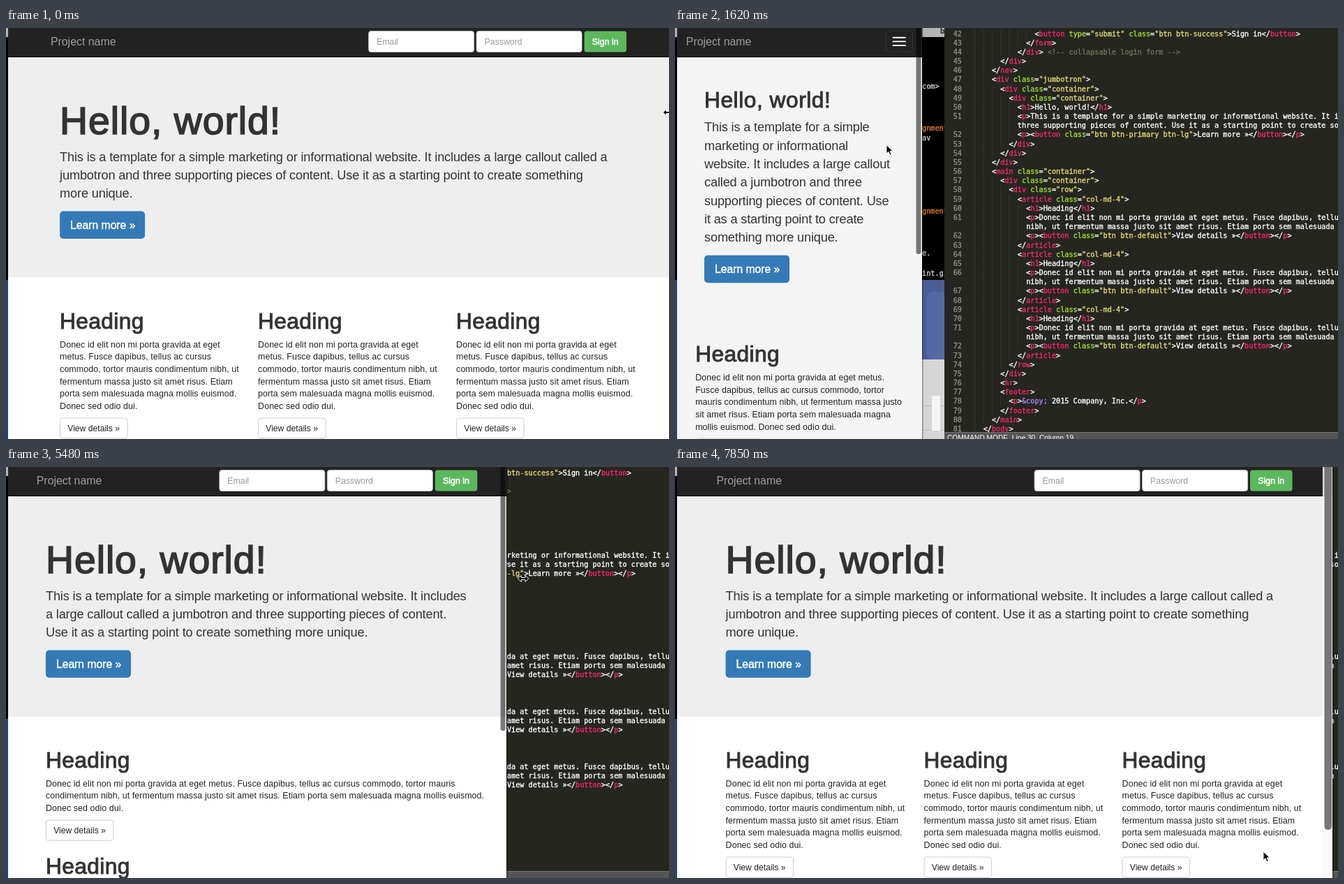
Animation, 950 px wide and 589 px high, one loop 8000 ms. Source, as an HTML page:

```html
<!DOCTYPE html>
<html lang="en">
<head>
<meta charset="utf-8">
<title>Responsive template</title>
<style>
  html, body { margin: 0; width: 100%; height: 100%; overflow: hidden; background: #000; }
  svg { display: block; font-family: "Liberation Sans", Arial, sans-serif; }
  text { white-space: pre; }
  .code { font: 10.2px "DejaVu Sans Mono", Menlo, monospace; color: #fff; }
  .code, .code tspan { fill: currentColor; stroke: currentColor; stroke-width: .35px; }
  .comment { color: #75715e; } .tag { color: #f92672; } .attr { color: #a6e22e; }
  .string { color: #e6db74; } .entity { color: #ae81ff; } .number { color: #8f908a; }
</style>
</head>
<body>
<svg id="stage" width="950" height="589" viewBox="0 0 950 589">
  <g id="desktop"></g>
  <g id="browser"></g>
</svg>
<script>
const LOOP = 8000, LEFT = 3, ZOOM = 0.88;
const LEAD = 'This is a template for a simple marketing or informational website. It includes a large callout called a jumbotron and three supporting pieces of content. Use it as a starting point to create something more unique.';
const BODY = 'Donec id elit non mi porta gravida at eget metus. Fusce dapibus, tellus ac cursus commodo, tortor mauris condimentum nibh, ut fermentum massa justo sit amet risus. Etiam porta sem malesuada magna mollis euismod. Donec sed odio dui.';

// ---------- helpers ----------
const $ = id => document.getElementById(id);
const escapeText = s => s.replace(/&/g, '&amp;').replace(/</g, '&lt;').replace(/>/g, '&gt;');
const rect = (x, y, w, h, fill, extra = '') =>
  `<rect x="${x}" y="${y}" width="${w}" height="${h}" fill="${fill}" ${extra}/>`;
const text = (x, y, size, fill, str, extra = '') =>
  `<text x="${x}" y="${y}" font-size="${size}" fill="${fill}" ${extra}>${escapeText(str)}</text>`;
const medium = (x, y, size, fill, str, weight = 0.025, spacing = 0) =>
  text(x, y, size, fill, str, `stroke="${fill}" stroke-width="${size * weight}" letter-spacing="${size * spacing}"`);

function track(keys, t) {
  const i = keys.findIndex(k => k[0] > t);
  if (i < 0) return keys[keys.length - 1].slice(1);
  if (i === 0) return keys[0].slice(1);
  const a = keys[i - 1], b = keys[i], u = (t - a[0]) / (b[0] - a[0]);
  return a.slice(1).map((v, n) => v + (b[n + 1] - v) * u);
}

const pen = document.createElement('canvas').getContext('2d');
const wrapCache = {};
function wrap(str, size, spacing, width) {
  const key = [str.length, size, width];
  if (wrapCache[key]) return wrapCache[key];
  pen.font = `${size}px "Liberation Sans", Arial, sans-serif`;
  const lines = [];
  let line = '';
  for (const word of str.split(' ')) {
    const next = line ? line + ' ' + word : word;
    if (line && pen.measureText(next).width + next.length * spacing > width) {
      lines.push(line);
      line = word;
    } else line = next;
  }
  return wrapCache[key] = [...lines, line];
}

// ---------- editor and desktop behind the browser ----------
const article = [
  [4, '<article class="col-md-4">'],
  [5, '<h1>Heading</h1>'],
  [5, '<p>Donec id elit non mi porta gravida at eget metus. Fusce dapibus, tellus ac cursus'],
  [5, 'nibh, ut fermentum massa justo sit amet risus. Etiam porta sem malesuada magna', 1],
  [5, '<p><button class="btn btn-default">View details »</button></p>'],
  [4, '</article>']
];
const source = [
  [6, '<button type="submit" class="btn btn-success">Sign in</button>'],
  [5, '</form>'],
  [4, '</div> <!-- collapsable login form -->'],
  [2, '</div>'],
  [1, '</nav>'],
  [1, '<div class="jumbotron">'],
  [2, '<div class="container">'],
  [3, '<div class="container">'],
  [4, '<h1>Hello, world!</h1>'],
  [4, '<p>This is a template for a simple marketing or informational website. It includes'],
  [4, 'three supporting pieces of content. Use it as a starting point to create something', 1],
  [4, '<p><button class="btn btn-primary btn-lg">Learn more »</button></p>'],
  [3, '</div>'],
  [2, '</div>'],
  [1, '</div>'],
  [1, '<main class="container">'],
  [2, '<div class="container">'],
  [3, '<div class="row">'],
  ...article, ...article, ...article,
  [3, '</row>'],
  [2, '</div>'],
  [2, '<hr>'],
  [2, '<footer>'],
  [3, '<p>&copy; 2015 Company, Inc.</p>'],
  [2, '</footer>'],
  [1, '</main>'],
  [0, '</body>']
];

function highlight(line) {
  const span = (cls, s) => `<tspan class="${cls}">${escapeText(s)}</tspan>`;
  const token = /(<!--.*-->)|(<\/?)(\w+)|(\w+)(?==")|("[^"]*")|(&\w+;)/g;
  let out = '', last = 0;
  for (const m of line.matchAll(token)) {
    out += escapeText(line.slice(last, m.index));
    if (m[1]) out += span('comment', m[1]);
    else if (m[2]) out += escapeText(m[2]) + span('tag', m[3]);
    else if (m[4]) out += span('attr', m[4]);
    else if (m[5]) out += span('string', m[5]);
    else out += span('entity', m[6]);
    last = m.index + m[0].length;
  }
  return out + escapeText(line.slice(last));
}

function editor() {
  const indentWidth = 12.29, rowHeight = 13.17;
  let number = 42;
  let out = rect(386, 0, 564, 589, '#252620');
  source.forEach(([indent, line, continued], i) => {
    const y = 11.6 + i * rowHeight;
    for (let j = -1; j < indent; j++)
      out += rect(441.5 + j * indentWidth, y - 10, 1, rowHeight, '#3b3c35', 'opacity=".7"');
    if (!continued) out += `<text class="code number" x="411" y="${y}" text-anchor="end">${number++}</text>`;
    out += `<text class="code" x="${441.7 + indent * indentWidth}" y="${y}">${highlight(line)}</text>`;
  });
  return out + rect(386, 579, 564, 10, '#555') + rect(386, 579, 564, 1, '#777') +
    text(390, 591, 10.2, '#fff', 'COMMAND MODE, Line 30, Column 19');
}

function desktop() {
  const shell = (y, str, color = '#d0d0d0') => `<text class="code" x="354" y="${y}" style="color:${color}">${str}</text>`;
  return rect(0, 0, 390, 361, '#000') + rect(0, 0, 390, 13, '#b4b4b4') +
    text(380, 8, 10.5, '#222', 'b', 'font-weight="bold"') +
    shell(87, 'com&gt;') + shell(147, 'gnment', '#e07a1f') + shell(161, 'av') +
    shell(266, 'gnment', '#e07a1f') + shell(326, 'e.') + shell(355, 'int.gi') +
    rect(0, 361, 3, 228, '#2b427f') + rect(3, 361, 383, 114, '#4a5d94') +
    rect(361, 378, 40, 97, '#566aa2', 'rx="8"') +
    rect(3, 475, 383, 114, '#d6d6d6') + rect(354, 541, 32, 1, '#bbb') +
    rect(354, 576, 32, 1, '#bbb') + rect(368, 527, 12, 50, '#f4f4f4');
}

// ---------- web page ----------
const input = (x, y, w, label) =>
  rect(x, y, w, 30, '#fff', 'rx="3.5" stroke="#ccc" stroke-width=".8"') + text(x + 11.5, y + 19.3, 12.3, '#999', label);
const signIn = (x, y) =>
  rect(x, y, 60.5, 30, '#5cb85c', 'rx="3.5"') + medium(x + 11.2, y + 19.3, 12.4, '#fff', 'Sign in', 0.04);

function section(x, baseline, width) {
  const lines = wrap(BODY, 12.45, 0.07, width);
  const top = baseline + 23 + (lines.length - 1) * 17.6 + 17.5;
  const out = medium(x, baseline, 31.7, '#333', 'Heading', 0.03, 0.012) +
    lines.map((s, i) => text(x, baseline + 27.3 + i * 17.6, 12.45, '#222', s, 'letter-spacing=".07"')).join('') +
    rect(x + 0.5, top, 96.5, 29, '#fff', 'rx="3.5" stroke="#ccc"') +
    text(x + 11.2, top + 19, 12.15, '#222', 'View details »');
  return { out, bottom: top + 29.5 };
}

function menu(right, height) {
  if (height < 1) return '';
  const w = right - LEFT;
  return `<svg x="${LEFT}" y="41" width="${w}" height="${height + 1}">` +
    rect(0, 0, w, 140, '#222') + rect(0, 0, w, 1, '#101010') + rect(0, 7, w, 1, '#101010') +
    input(13, 17, w - 26, 'Email') + input(13, 51, w - 26, 'Password') + signIn(13, 86) +
    rect(0, 125, w, 1, '#101010') + '</svg>' + rect(LEFT, 41 + height, w, 1, '#080808');
}

function navbar(left, right, edge, phone, t) {
  let out = rect(LEFT, 0, right - LEFT, 42, '#222') + rect(LEFT, 41, right - LEFT, 1, '#080808') +
    text(left, 24.6, 15.9, '#9d9d9d', 'Project name');
  if (phone) {
    const focused = t >= 2650 && t < 4880;
    out += rect(right - 51.5, 4.5, 38, 29.5, focused ? '#333' : 'none', 'rx="3.5" stroke="#333"');
    for (const y of [12.8, 18.4, 24]) out += rect(right - 42.5, y, 19.5, 1.9, '#fff', 'rx=".9"');
    return out;
  }
  const end = edge - 15.2;
  return out + input(end - 369.5, 4.4, 151, 'Email') + input(end - 215, 4.4, 151, 'Password') + signIn(end - 60.5, 4.4);
}

function page(right, t) {
  const phone = right < 679, wide = right >= 876;
  const container = (wide ? 970 : 750) * ZOOM;
  const start = phone ? LEFT : (right + 4) / 2 - container / 2;
  const brand = start + 13.2;
  const leadX = phone ? 42 : brand + 13.2;
  const mainX = phone ? 29.2 : leadX;
  const leadWidth = phone ? right - 82 : wide ? 795 : 610;
  const lines = wrap(LEAD, 18.2, -0.165, leadWidth);
  const leadY = phone ? 148.3 : 190.5;
  const buttonY = leadY + (lines.length - 1) * 26.35 + 19.3;
  const bottom = buttonY + 95;

  const settling = t > 1000 && t < 2750;
  const narrowed = t > 2750 && t < 4880;
  const below = settling ? '#f4f4f4' : narrowed ? '#f3f3f3' : '#fff';
  const jumboEnd = settling ? 0 : narrowed ? 325 : bottom;

  let out = rect(0, 0, right, 589, below) + rect(0, 0, right, jumboEnd, '#eee');
  out += medium(leadX, phone ? 114.3 : 152, phone ? 31.7 : 55.4, '#333', 'Hello, world!', 0.03, 0.017);
  lines.forEach((s, i) => out += text(leadX, leadY + i * 26.35, 18.2, '#333', s, 'letter-spacing="-.165"'));
  out += rect(leadX, buttonY, 122, 39.5, '#337ab7', 'rx="5"') +
    medium(leadX + 15, buttonY + 25.6, 15.7, '#fff', 'Learn more »', 0.03);

  let baseline = buttonY + (phone ? 152.2 : 168);
  if (wide) {
    for (let i = 0; i < 3; i++) out += section(mainX + i * 284, baseline, 262).out;
  } else {
    for (let i = 0; i < 3 && baseline < 620; i++) {
      const part = section(mainX, baseline, phone ? right - 54 : 633);
      out += part.out;
      baseline = part.bottom + 47;
    }
  }
  out += navbar(phone ? 15.8 : brand, right, start + container, phone, t);
  if (phone) out += menu(right, track(MENU, t)[0]);
  return out + scrollbar(right, phone, wide, t);
}

function scrollbar(right, phone, wide, t) {
  if (t < 290 || (t > 3000 && t < 4880)) return '';
  const end = phone ? 324 + (right - 354) * 0.356 : wide ? 520 : 378;
  if (t > 7200)
    return rect(right - 14, 0, 14, 589, '#fafafa', 'opacity=".85"') +
      rect(right - 11.5, -8, 10.5, end + 8, '#777', 'rx="5"');
  return rect(right - 8.5, -8, 7, end + 8, '#000', 'rx="3.5" opacity=".52"');
}

// ---------- pointers ----------
const outline = 'fill="#000" stroke="#fff" stroke-width="1" stroke-linejoin="round"';
const pointers = {
  resize: `<path d="M-7.5 0l4.5-4.5v3h6v-3l4.5 4.5l-4.5 4.5v-3h-6v3z" ${outline}/>`,
  arrow: `<path d="M0 0v12.5l2.9-2.7l2.1 5l2.2-1l-2.1-4.8h4z" ${outline}/>`,
  hand: '<path d="M-2.5 -6.5q1.5-1.5 2.6.2v4q4-.4 5.2 1.8q.8 3-1 7.5h-6l-3.8-5.5q0-2 1.8-1l1.2 1z" fill="#fff" stroke="#000" stroke-width="1.1"/>'
};
const pointerKind = t =>
  t >= 2500 && t < 4000 ? 'hand' :
  (t > 1600 && t < 2500) || (t >= 4000 && t < 4200) || t > 7100 ? 'arrow' : 'resize';

// ---------- motion ----------
const EDGE = [[0, 951], [152, 951], [1036, 514], [1183, 425], [1330, 354], [4742, 354], [5484, 717],
  [5930, 866], [6080, 898], [6370, 912], [6520, 928], [6670, 937], [6970, 940], [7117, 942]];
const POINTER = [[0, 949, 121], [152, 948, 121], [1036, 511, 182], [1330, 318, 190], [1480, 300, 190],
  [2510, 321, 33], [3850, 321, 33], [4290, 352, 122], [4742, 352, 122], [5484, 741, 160], [5930, 893, 172],
  [6080, 924, 175], [6370, 938, 177], [6670, 933, 178], [6970, 938, 180], [7117, 925, 230], [7850, 843, 551]];
const MENU = [[2510, 0], [2660, 12], [2810, 86], [2960, 125], [3110, 131], [3550, 131], [3700, 116], [3850, 42], [3997, 0]];

const BURSTS = [[300, 1330, 8], [1480, 2510, 8], [2660, 3260, 5], [3700, 4290, 5], [4890, 5930, 8],
  [6080, 6080, 1], [6370, 6670, 3], [6970, 7850, 7]];
const ROUNDING = 10; // refreshes fall on whole hundredths of a second

function lastRefresh(t) {
  let latest = 0;
  for (const [from, to, count] of BURSTS) {
    if (t < from) break;
    const step = (to - from) / Math.max(1, count - 1);
    latest = step ? Math.min(to, from + Math.floor((t - from + ROUNDING) / step) * step) : from;
  }
  return latest;
}

function render(t) {
  const [right] = track(EDGE, t), [x, y] = track(POINTER, t);
  $('browser').innerHTML =
    rect(right, 0, 1.5, 589, '#000', 'opacity=".35"') +
    `<svg x="${LEFT}" y="0" width="${right - LEFT}" height="589" viewBox="${LEFT} 0 ${right - LEFT} 589">${page(right, t)}</svg>` +
    `<g transform="translate(${x} ${y})">${pointers[pointerKind(t)]}</g>`;
}

$('desktop').innerHTML = desktop() + editor();
let shown = -1;
const began = performance.now();
function frame() {
  const t = lastRefresh((performance.now() - began) % LOOP);
  if (t !== shown) render(shown = t);
  requestAnimationFrame(frame);
}
frame();
</script>
</body>
</html>
```
